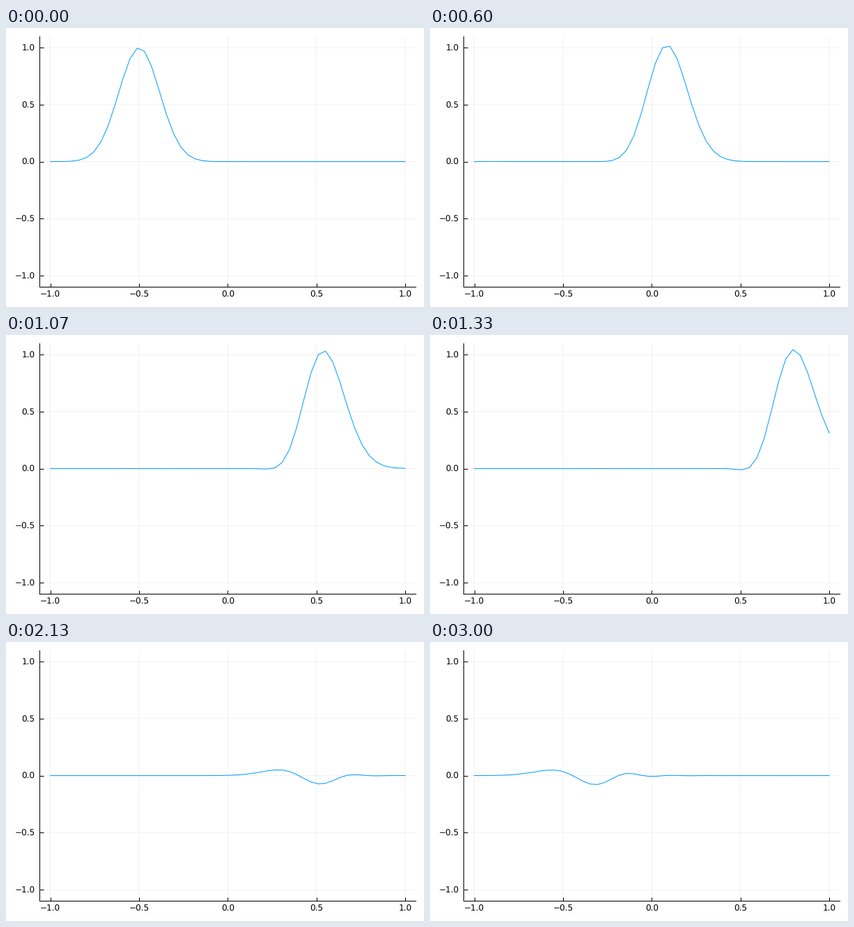
Write a matplotlib script that moves like this. It is 600x400 px and loops after 3030 ms.

```python
import matplotlib.pyplot as plt
import numpy as np
from matplotlib.animation import FuncAnimation

W, H, DPI = 600, 400, 100
PX = 72 / DPI  # one pixel in points
STATES, DT, STEPS = 91, 0.001, 33
TICK_MS, LOOP_MS = 10, 3030

x = np.linspace(-1, 1, 50)
h = x[1] - x[0]


def rate(u, v):
    """Wave equation with one-sided outflow conditions at both ends."""
    du, dv = v.copy(), np.zeros_like(v)
    dv[1:-1] = (u[2:] - 2 * u[1:-1] + u[:-2]) / h**2
    du[0] = (u[1] - u[0]) / h
    du[-1] = -(u[-1] - u[-2]) / h
    return du, dv


def solve():
    """Forward Euler, keeping the first and then every 33rd step."""
    u = np.exp(-37.5 * (x + 0.5) ** 2)
    v = 75 * (x + 0.5) * u  # moving right
    waves = []
    for i in range((STATES - 1) * STEPS + 1):
        du, dv = rate(u, v)
        u, v = u + DT * du, v + DT * dv
        if i % STEPS == 0:
            waves.append(u)
    return waves


waves = solve()

plt.rcParams.update({"font.family": "DejaVu Sans", "text.hinting": "none"})
fig = plt.figure(figsize=(W / DPI, H / DPI), dpi=DPI, facecolor="white")
left, right, top, bottom = 48.4, 588.3, 11.8, 371.4
ax = fig.add_axes([left / W, 1 - bottom / H, (right - left) / W, (bottom - top) / H])
ax.set(xlim=(-1.06, 1.06), ylim=(-1.1, 1.1))

ticks = np.arange(-1, 1.1, 0.5)
labels = [f"{t:.1f}".replace("-", "\u2212") for t in ticks]
ax.set_xticks(ticks, labels)
ax.set_yticks(ticks, labels)
ax.tick_params(direction="in", length=5.5 * PX, width=PX, labelsize=12 * PX)
ax.tick_params(axis="x", pad=5.5 * PX)
ax.tick_params(axis="y", pad=7 * PX)
ax.grid(color="black", alpha=0.1, linewidth=0.5 * PX)
ax.set_axisbelow(True)
for mark in (ax.get_xgridlines() + ax.get_ygridlines()
             + ax.get_xticklines() + ax.get_yticklines()):
    mark.set_snap(False)
ax.spines[["top", "right"]].set_visible(False)
ax.spines[["left", "bottom"]].set_linewidth(PX)

line, = ax.plot(x, waves[0], color="#009AFA", lw=PX, solid_joinstyle="miter")


def update(k):
    # states change at 30 per second, rounded to whole ticks
    n = (TICK_MS * k + TICK_MS // 2) * 3 // 100
    line.set_ydata(waves[n])
    return line,


anim = FuncAnimation(fig, update, frames=LOOP_MS // TICK_MS, interval=TICK_MS,
                     repeat=True, repeat_delay=0, blit=False)
plt.show()
```
